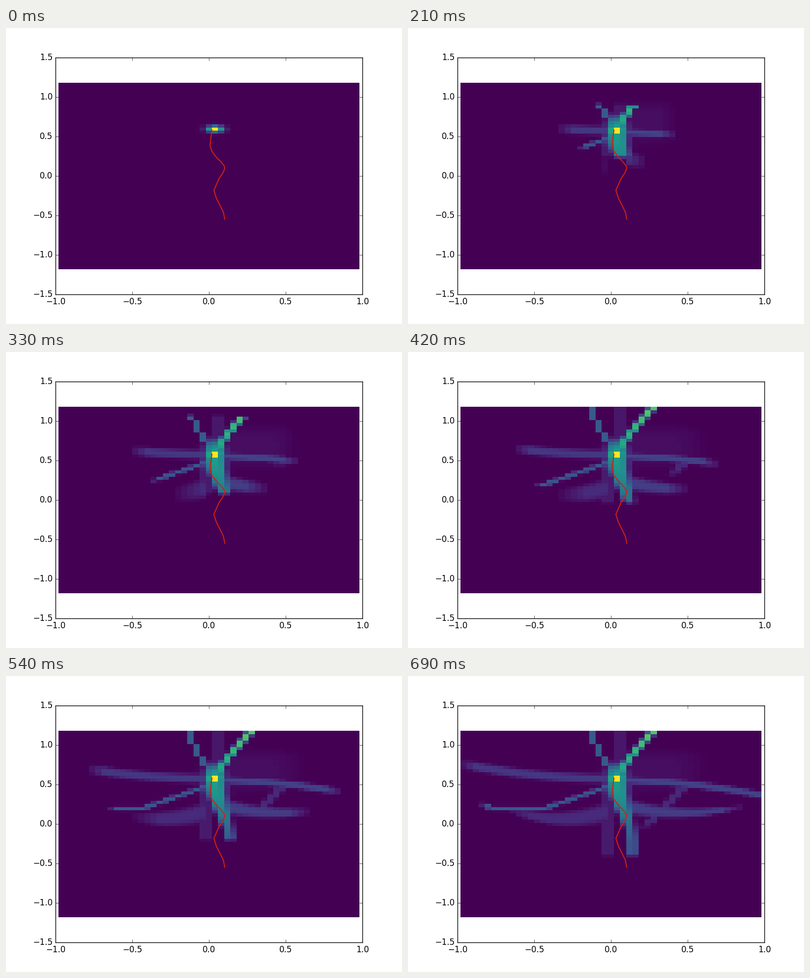
Recreate the animation shown at these times as a matplotlib script. Size 800 by 600 pixels, loop 0.72 s.

```python
import numpy as np
import matplotlib.pyplot as plt
from matplotlib.animation import FuncAnimation

FRAMES, INTERVAL = 24, 30
CELL = 0.04
NX, NY = 49, 59

plt.rcParams.update({
    "font.family": "DejaVu Sans", "font.size": 12, "axes.linewidth": 1.0,
    "xtick.direction": "in", "ytick.direction": "in",
    "xtick.top": True, "ytick.right": True,
    "xtick.major.size": 4, "ytick.major.size": 4,
    "xtick.major.width": 0.5, "ytick.major.width": 0.5,
    "xtick.major.pad": 4, "ytick.major.pad": 4,
    "ytick.alignment": "center",
})

# Cells are counted from the centre of the plot; the outlet is at (1, 14.5).
C, R = np.meshgrid(np.arange(NX) - NX // 2, np.arange(NY) - NY // 2)
layers = []  # (final density, frame at which each cell is full, ramp length)


def add(level, arrival, ramp):
    layers.append((level, arrival, ramp))


def hump(offset, width):
    return np.exp(-(offset / width) ** 4)


def streak(along, across, centre, level, width, lag, ramp, start=1, end=40):
    """Band that advances one cell per frame and follows a centre line."""
    inside = (along >= start) & (along <= end)
    add(inside * level * hump(across - centre, width), along + lag, ramp)


# Central plume: sinks, narrows and drifts to the right
spread = np.maximum(R - 15, 14 - R)
fall = np.clip((14 - R) / 20, 0, 1)
ease = fall * fall * (3 - 2 * fall)
plume = (.55 - .25 * ease) * hump(C - 1 - 2.45 * ease, 1.65 - .9 * ease)
add(plume * hump(np.maximum(R - 14, 0), 5), spread, 1.5)
add(.18 * hump(C - 1, 2.4) * hump(R - 13, 5), spread, 1.5)

# Faint columns below and above the outlet, then its brightest cells
add(.07 * ((C == -1) | (C == 0)) * (R < 18), spread, 1.5)
add(.06 * ((C == 1) | (C == 2)) * (R > 14), spread, 1.5)
add((abs(R - 14.5) < 1) * ((C == 1) + .58 * (C == 0)), spread, 1)

# Upper branches
up = R - 15
rise = np.maximum(up + 1, 0)
streak(up, C, 1 + .16 * rise ** 1.32, .55 + .013 * rise, .7, 0, 1, start=2)
streak(up, C, -np.round((up - 1.5) / 3.6), .28, .6, 0, 1.5, start=3)

# Side streaks
left, right = -C, C
streak(left, R, 14.5 + .0078 * left ** 2, .16, 1.4, 1, 3)
streak(right, R, 14 - .008 * right ** 2, .2, 1.1, -1, 3, start=3)
slope = np.maximum(12.3 - .67 * left, .6 * left - 6.4)
streak(left, R, np.maximum(slope, 5), .27, .75, 3, 1.5)

# Lower arcs and the branch that turns back under the right streak
streak(left, R, 1.8 + .04 * (left - 8) ** 2, .12,
       np.maximum(3 - .12 * left, .8), 10, 5)
streak(right, R, 3.7 + .022 * (right - 12) ** 2, .18,
       np.maximum(2.4 - .08 * right, .8), 5, 4, start=3)
down = 12 - R
streak(down, C, 12 - .5 * down, .12, .9, 12, 3, end=13)

# Haze right of the outlet
add(.035 * hump(C - 7, 7) * hump(R - 17, 6) * (C > 2), C - 1, 3)

burst = np.exp(-.65 * (C - 1) ** 2 - 1.1 * (R - 15) ** 2)


def density(i):
    total = burst.copy()
    if i:
        for level, arrival, ramp in layers:
            grown = level * np.clip(1 + (i - arrival) / ramp, 0, 1)
            total = np.maximum(total, grown)
    return total


def cell_edges(count, shift):
    """Cell borders with a sub-pixel shift inside a fixed outer frame."""
    edges = (np.arange(count + 1) - count / 2) * CELL
    edges[1:-1] += shift
    return edges


fig = plt.figure(figsize=(8, 6), dpi=100, facecolor="white")
ax = fig.add_axes([0.125, 0.1, 0.775, 0.8])
mesh = ax.pcolormesh(cell_edges(NX, -.3 / 310), cell_edges(NY, -.75 / 160),
                     density(0), cmap="viridis", vmin=0, vmax=1)

path = np.array([
    (416, 207), (412, 238), (416, 250), (425, 262), (434, 271), (441, 280),
    (441.8, 285), (438, 294), (430, 306), (420, 329), (425, 345), (439, 373),
    (442, 387.5)])
ax.plot((path[:, 0] - 410) / 310, (300 - path[:, 1]) / 160,
        color="#d2200f", lw=1.5)

ax.set_xlim(-1, 1)
ax.set_ylim(-1.5, 1.5)
ax.set_xticks(np.arange(-1, 1.1, 0.5))
ax.set_yticks(np.arange(-1.5, 1.6, 0.5))


def update(i):
    mesh.set_array(density(i))
    return [mesh]


anim = FuncAnimation(fig, update, frames=FRAMES, interval=INTERVAL,
                     repeat=True, repeat_delay=0)
plt.show()
```
